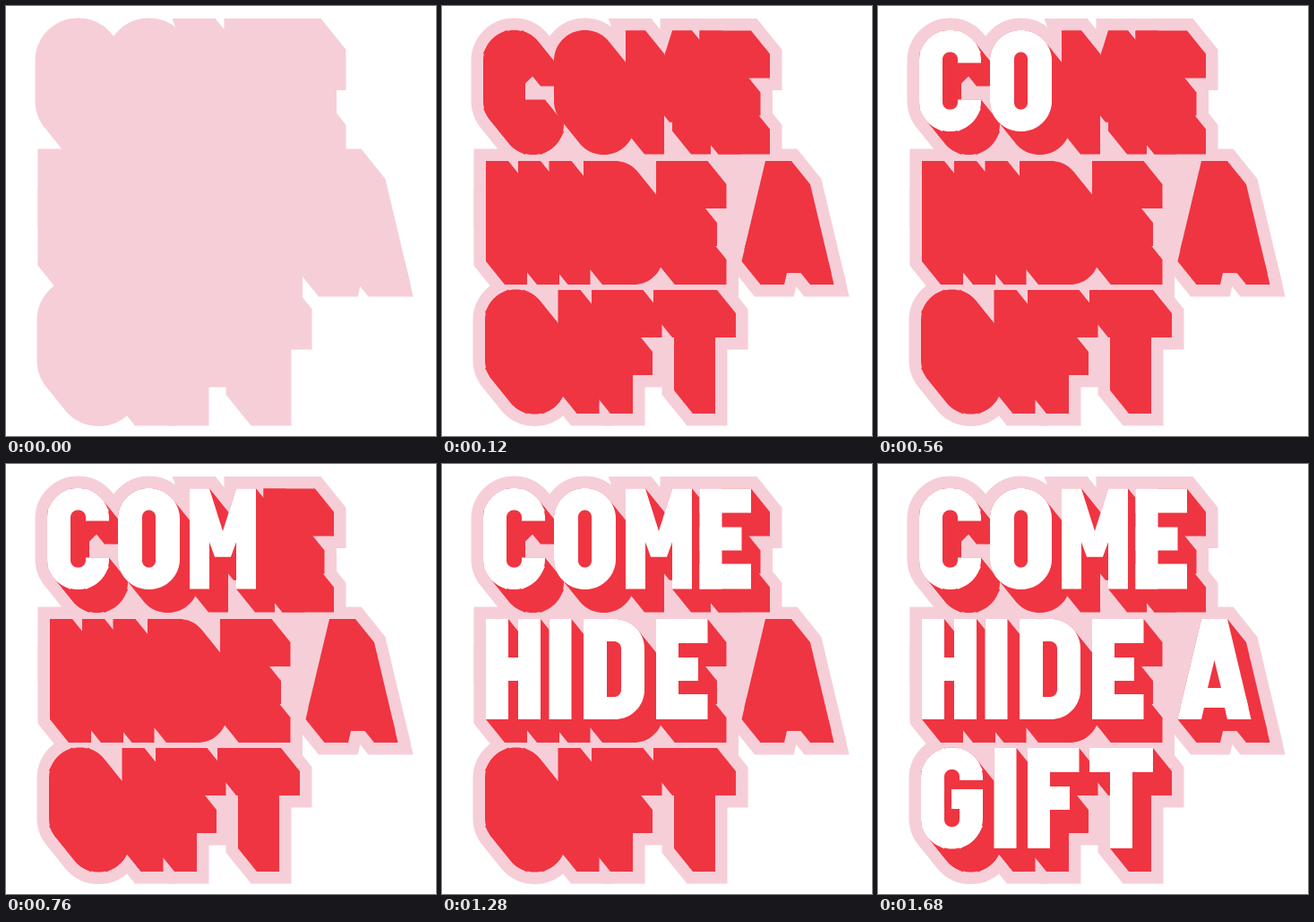
An HTML page for the animation above (1960 ms loop, 480 px wide and 480 px high).

```html
<!DOCTYPE html>
<html lang="en">
<head>
<meta charset="utf-8">
<title>Come hide a gift</title>
<style>
  html, body { margin: 0; width: 100%; height: 100%; overflow: hidden; background: #fff; }
  svg { display: block; width: 100vw; height: 100vh; }
  .edge { fill: #f6ced8; stroke: #f6ced8; stroke-width: 27; stroke-linejoin: miter; stroke-miterlimit: 4; }
  .gap { fill: #f6ced8; }
  .side, .hole { fill: #ef3541; }
  .face { fill: #fff; }
</style>
</head>
<body>
<svg viewBox="0 0 480 480" role="img" aria-label="COME HIDE A GIFT"></svg>
<script>
const LOOP = 1960;
const DEPTH = [21, 26];
const TALL = 112;

// Convex shapes, as point lists
const rect = (x, y, w, h) => [[x, y], [x + w, y], [x + w, y + h], [x, y + h]];

function round(x, y, w, h, tl, tr = tl, br = tl, bl = tl) {
  const pts = [];
  const arc = (cx, cy, r, start) => {
    for (let i = 0; i <= 20; i++) {
      const a = (start + i / 20) * Math.PI / 2;
      pts.push([cx + r * Math.cos(a), cy + r * Math.sin(a)]);
    }
  };
  arc(x + tl, y + tl, tl, 2);
  arc(x + w - tr, y + tr, tr, 3);
  arc(x + w - br, y + h - br, br, 0);
  arc(x + bl, y + h - bl, bl, 1);
  return pts;
}

const clamp = (v, lo, hi) => Math.min(Math.max(v, lo), hi);
const clip = (pts, x0, y0, x1, y1) =>
  pts.map(([x, y]) => [clamp(x, x0, x1), clamp(y, y0, y1)]);
const shift = (pts, dx, dy) => pts.map(([x, y]) => [x + dx, y + dy]);
const sweep = pts => [...pts, ...shift(pts, ...DEPTH)];

function hull(pts) {
  const sorted = [...pts].sort((a, b) => a[0] - b[0] || a[1] - b[1]);
  const half = list => {
    const out = [];
    for (const p of list) {
      while (out.length > 1) {
        const [a, b] = out.slice(-2);
        if ((b[0] - a[0]) * (p[1] - a[1]) - (b[1] - a[1]) * (p[0] - a[0]) > 1e-6) break;
        out.pop();
      }
      out.push(p);
    }
    return out.slice(0, -1);
  };
  return [...half(sorted), ...half(sorted.reverse())];
}

// Letters: convex parts, holes cut into the face, and an outer shape where parts are slices
const pill = round(0, -0.5, 69, 113, 34);
const corner = (x, y, dx, dy) => [[x, y], [x + dx, y], [x, y + dy]];
const curl = [
  clip(pill, 0, -1, 26, 113),
  clip(pill, 0, -1, 69, 25),
  clip(pill, 0, 87, 69, 113),
  clip(pill, 43, -1, 69, 36),
  corner(26, 24, 9, 9), corner(43, 24, -9, 9),
  corner(26, 88, 9, -9), corner(43, 88, -9, -9)
];
const stem = x => rect(x, 0, 25, TALL);

const letters = {
  A: {
    parts: [
      [[26.5, 0], [55.5, 0], [79.1, 99], [2.9, 99]],
      [[5.2, 90], [31.6, 90], [26.5, TALL], [0, TALL]],
      [[50.4, 90], [76.8, 90], [82, TALL], [55.5, TALL]]
    ],
    holes: [[[41, 46], [48.5, 77], [33.5, 77]]]
  },
  C: {
    outer: [pill],
    parts: [...curl, clip(pill, 43, 77, 69, 113)],
    holes: [round(26, 24, 17, 64, 8)]
  },
  D: {
    parts: [round(0, 0, 68, TALL, 0, 33, 33, 0)],
    holes: [round(26, 25, 16, 62, 0, 8, 8, 0)]
  },
  E: {
    parts: [stem(0), rect(0, 0, 57.5, 27), rect(0, 43, 47, 26), rect(0, 84, 57.5, 28)]
  },
  F: {
    parts: [stem(0), rect(0, 0, 57.5, 27), rect(0, 43, 47, 26)]
  },
  G: {
    outer: [pill],
    parts: [...curl, clip(pill, 43, 46, 69, 113), rect(34, 46, 35, 22)],
    holes: [round(26, 24, 17, 22, 8, 8, 0, 0), round(26, 68, 17, 20, 0, 0, 8, 8)]
  },
  H: {
    parts: [stem(0), stem(36), rect(0, 43, 61, 26)]
  },
  I: { parts: [stem(0)] },
  M: {
    parts: [
      rect(0, 0, 22, TALL), rect(52, 0, 22, TALL),
      [[0, 0], [22, 0], [46, 76], [28, 76]],
      [[74, 0], [52, 0], [28, 76], [46, 76]]
    ]
  },
  O: {
    parts: [pill],
    holes: [round(27, 24, 15, 64, 7.5)]
  },
  T: {
    parts: [rect(0, 0, 71, 27), stem(23)]
  }
};

// Letter, x, y, time its face appears
const layout = [
  ['C', 46, 27.5, 360], ['O', 125, 27.5, 560], ['M', 205, 27.5, 760], ['E', 287.5, 27.5, 960],
  ['H', 49, 173, 1280], ['I', 119.5, 173, 1280], ['D', 158, 173, 1280], ['E', 239, 173, 1280],
  ['A', 334.5, 173, 1480],
  ['G', 48, 317, 1680], ['I', 129.5, 317, 1680], ['F', 167, 317, 1680], ['T', 236, 317, 1680]
];

const svg = document.querySelector('svg');
const toPath = pts => 'M' + pts.map(p => p.map(v => v.toFixed(2)).join()).join('L') + 'Z';

function add(parent, tag, attrs = {}) {
  const el = document.createElementNS('http://www.w3.org/2000/svg', tag);
  for (const key in attrs) el.setAttribute(key, attrs[key]);
  return parent.appendChild(el);
}

function fill(parent, shapes, name) {
  for (const s of shapes) add(parent, 'path', { class: name, d: toPath(hull(s)) });
}

// Hard opacity changes at [time, value] pairs
function steps(el, ...marks) {
  const frames = [[0, 0], ...marks, [LOOP, 1]].map(([time, opacity]) =>
    ({ opacity, offset: time / LOOP, easing: 'step-end' }));
  el.animate(frames, { duration: LOOP, iterations: Infinity });
}

const edge = add(svg, 'g');
const side = add(svg, 'g');
const faces = add(svg, 'g');

// Backing between the words of the middle row
fill(edge, [[[290, 159.5], [370, 159.5], [340, 300], [290, 300]]], 'gap');

for (const [name, x, y, at] of layout) {
  const { parts, holes = [], outer = parts } = letters[name];
  const place = shapes => shapes.map(s => shift(s, x, y));
  fill(edge, place(outer).map(sweep), 'edge');
  fill(side, place(parts).map(sweep), 'side');

  const face = add(faces, 'g');
  fill(face, place(parts), 'face');
  fill(face, place(holes), 'hole');
  steps(face, [at, 1]);
}
steps(side, [40, 0.5], [120, 1]);
</script>
</body>
</html>
```
